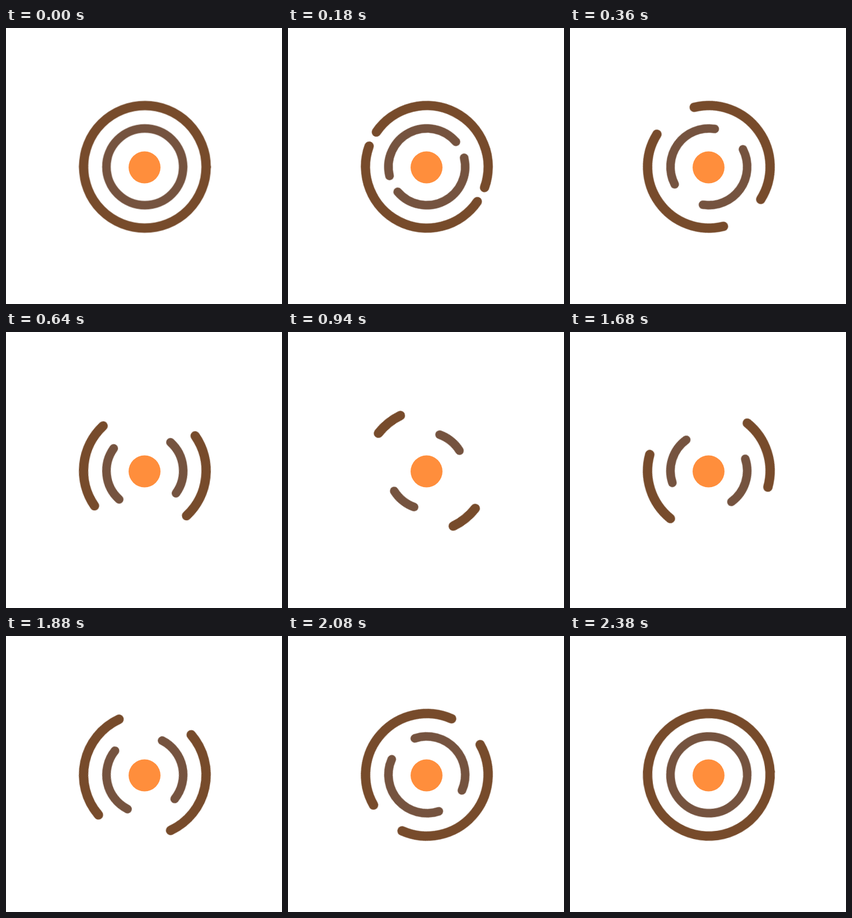
Recreate the animation shown at these times as an HTML page. Size 500 px wide and 500 px high, loop 2400 ms.

```html
<!DOCTYPE html>
<html lang="en">
<head>
<meta charset="utf-8">
<title>Loader</title>
<style>
  html, body { margin: 0; width: 100%; height: 100%; overflow: hidden; background: #fff; }
  svg { display: block; width: 500px; height: 500px; }
  .ring { fill: none; stroke-linecap: round; }
</style>
</head>
<body>
<svg viewBox="0 0 500 500">
  <g transform="translate(251.5 251.5)">
    <circle id="outer" class="ring" r="111" pathLength="360" stroke="#774b2b" stroke-width="17"/>
    <circle id="inner" class="ring" r="69.5" pathLength="360" stroke="#75533f" stroke-width="15.6"/>
  </g>
  <circle cx="251" cy="252.5" r="28.9" fill="#ff8e3c"/>
</svg>
<script>
  const LOOP = { duration: 2400, iterations: Infinity };

  // Two opposite arcs, each spanning 180 degrees down to 0 and back, centred on the turning axis.
  const full = { strokeDasharray: '180 0', strokeDashoffset: '90' };
  const none = { strokeDasharray: '0 180', strokeDashoffset: '0' };

  function spin(id, dir, easing) {
    const ring = document.getElementById(id);
    const anims = [
      ring.animate([
        { transform: `rotate(${dir * 90}deg)` },
        { transform: `rotate(${dir * 450}deg)` }
      ], LOOP),
      ring.animate([{ ...full, easing }, { ...none, easing }, full], LOOP)
    ];
    for (const a of anims) a.startTime = 0;
  }

  spin('outer', 1, 'cubic-bezier(.24, 0, .76, 1)');
  spin('inner', -1, 'linear');
</script>
</body>
</html>
```
